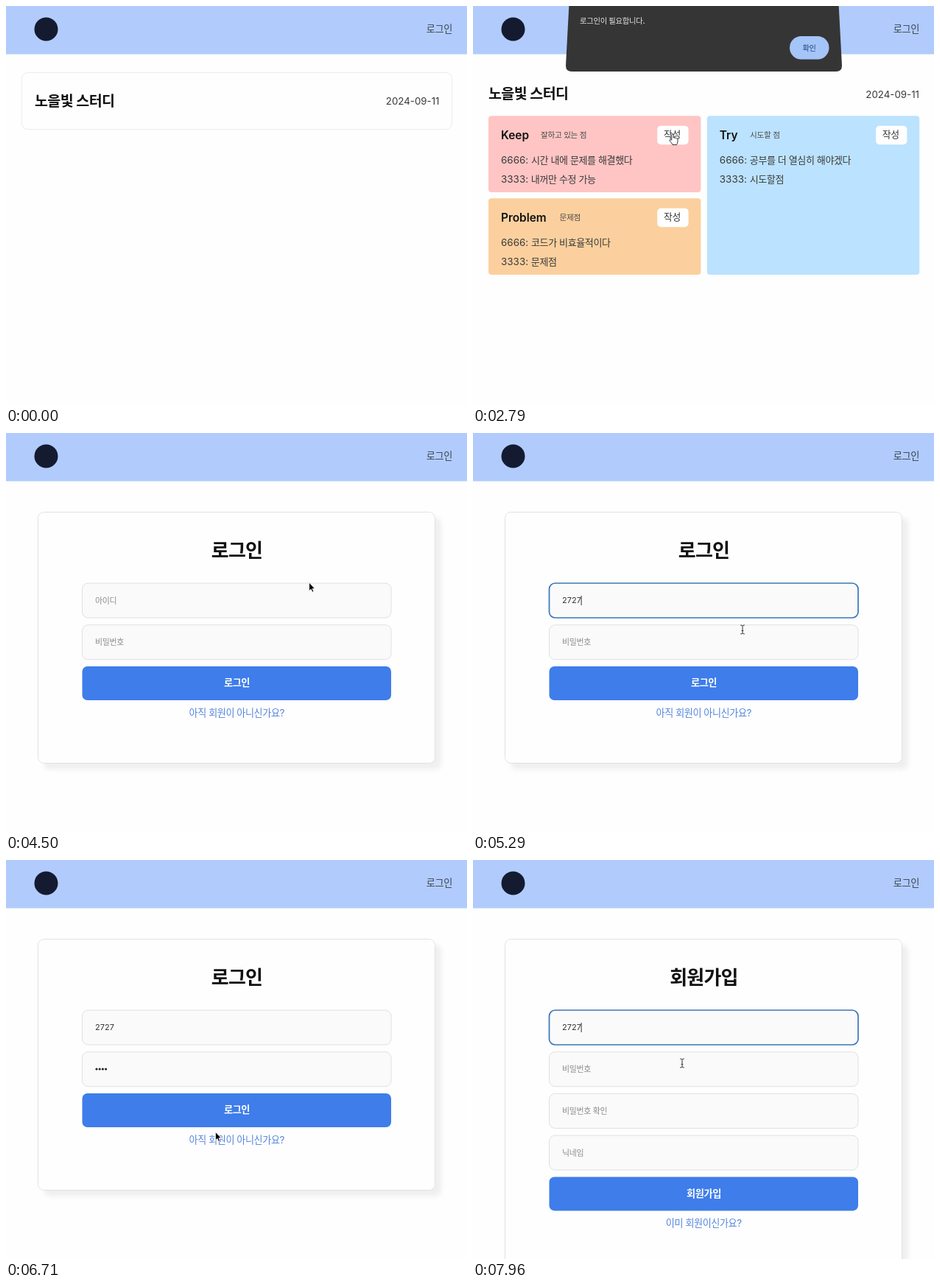
Write an HTML page that moves like this. It is 626 by 542 pixels and loops after 8 s.

```html
<!DOCTYPE html>
<html lang="ko">
<head>
<meta charset="utf-8">
<style>
  html, body { margin: 0; width: 100%; height: 100%; overflow: hidden; background: #fefefe; }
  svg { display: block; width: 626px; height: 542px; font-family: Inter, "Noto Sans CJK KR", "Noto Sans CJK", sans-serif; }
  .ko { font-size: .97em; letter-spacing: -.03em; }
  .card { fill: #fefefe; stroke: #e2e2e2; filter: drop-shadow(8px 8px 3px #0000000f); }
</style>
</head>
<body>
<svg id="stage" viewBox="0 0 626 542"></svg>
<script>
const LOOP = 8000;
const stage = document.getElementById('stage');
const clamp = v => Math.max(0, Math.min(1, v));
const ease = v => v * v * (3 - 2 * v);

// Hangul runs are set slightly tighter than Latin text.
const text = (x, y, size, str, fill = '#333', weight = 400, anchor = 'start') =>
  `<text x="${x}" y="${y}" font-size="${size}" fill="${fill}" font-weight="${weight}" text-anchor="${anchor}">` +
  str.replace(/[가-힣]+( [가-힣]+)*/g, '<tspan class="ko">$&</tspan>') + '</text>';
const rect = (x, y, w, h, r, fill, attrs = '') =>
  `<rect x="${x}" y="${y}" width="${w}" height="${h}" rx="${r}" fill="${fill}" ${attrs}/>`;

const header = () =>
  rect(0, 0, 626, 65.5, 0, '#b1ccfc') +
  '<circle cx="54.5" cy="31.5" r="16" fill="#141b30"/>' +
  text(606, 35.7, 13.6, '로그인', '#3a4355', 400, 'end');

const listPage = () =>
  rect(21.5, 90.5, 584, 77, 8, '#fefefe', 'stroke="#ebebeb"') +
  text(39, 135.5, 20.1, '노을빛 스터디', '#111', 600) +
  text(588.5, 134, 13.3, '2024-09-11', '#3a3a3a', 400, 'end');

function panel(x, y, h, fill, title, noteX, note, items) {
  return rect(x, y, 288.4, h, 4, fill) +
    text(x + 17, y + 31.2, 15.4, title, '#111', 600) +
    text(noteX, y + 29.2, 11, note, '#4a4a4a') +
    rect(x + 229.2, y + 13.4, 42.4, 25.5, 5, '#fefefe') +
    text(x + 249.4, y + 30, 13.2, '작성', '#333', 400, 'middle') +
    items.map((s, i) => text(x + 17, y + 64.9 + i * 25.6, 13.45, s, '#3a3a3a')).join('');
}

const boardPage = () =>
  text(21, 126.2, 20.1, '노을빛 스터디', '#111', 600) +
  text(606, 124.8, 13.3, '2024-09-11', '#3a3a3a', 400, 'end') +
  panel(21, 149.3, 103.7, '#fec5c4', 'Keep', 92, '잘하고 있는 점', ['6666: 시간 내에 문제를 해결했다', '3333: 내꺼만 수정 가능']) +
  panel(21, 261.3, 103.7, '#fbd09e', 'Problem', 117.5, '문제점', ['6666: 코드가 비효율적이다', '3333: 문제점']) +
  panel(317.8, 149.3, 215.7, '#bbe2fe', 'Try', 376, '시도할 점', ['6666: 공부를 더 열심히 해야겠다', '3333: 시도할점']);

function field(row, hint, { count = 0, focus = false, secret = false } = {}) {
  const y = 204 + row * 56.7;
  let value = text(121, y + 27.5, 11.3, hint, '#8c8c8c');
  if (count && secret) {
    value = '';
    for (let i = 0; i < count; i++) value += `<circle cx="${123 + i * 4.2}" cy="${y + 23.3}" r="1.6" fill="#222"/>`;
  } else if (count) {
    value = text(121, y + 27, 11, '2727'.slice(0, count), '#333');
  }
  const caretX = 121 + count * (secret ? 4.3 : 6.4);
  return rect(103.5, y, 419.5, 47, 8, '#fafafa', focus ? 'stroke="#3b75bb" stroke-width="1.7"' : 'stroke="#e0e0e0"') +
    value + (focus ? rect(caretX, y + 17, 1, 13, 0, '#333') : '');
}

function form(height, title, fields, link) {
  const y = 204 + fields.length * 56.7;
  return `<rect class="card" x="43.5" y="107.5" width="539" height="${height}" rx="8"/>` +
    text(313.5, 168.5, 26.8, title, '#111', 600, 'middle') + fields.join('') +
    rect(103.5, y - .4, 419.5, 46, 7, '#3e7dea') +
    text(313.5, y + 27, 13.6, title, '#fff', 600, 'middle') +
    text(313.5, y + 67.5, 13.5, link, '#5585dc', 400, 'middle');
}

// Characters typed so far, one every `step` ms.
const typed = (t, start, step) => Math.max(0, Math.min(4, Math.floor((t - start) / step) + 1));

const loginPage = t => form(341, '로그인', [
  field(0, '아이디', { count: typed(t, 4850, 90), focus: t >= 4650 && t < 5330 }),
  field(1, '비밀번호', { count: typed(t, 5370, 65), focus: t >= 5330 && t < 5930, secret: true })
], '아직 회원이 아니신가요?');

const joinPage = t => form(454, '회원가입', [
  field(0, '아이디', { count: typed(t, 7640, 85), focus: t >= 7540 }),
  field(1, '비밀번호'), field(2, '비밀번호 확인'), field(3, '닉네임')
], '이미 회원이신가요?');

function alertSheet(t, open, close, message) {
  const p = Math.min(clamp((t - open) / 160), clamp((close + 160 - t) / 160));
  if (!p) return '';
  return `<g opacity="${p}" transform="translate(0 ${(p - .75) * 40})">` +
    '<path d="M133-60L126 71q0 8 8 8H493q8 0 8-8L494-60z" fill="#353535"/>' +
    text(145, 13.5, 10.7, message, '#e6e6e6', 500) +
    rect(430, 31, 53.5, 31.5, 15.7, '#a5c4f7') +
    text(456.5, 50.5, 10.5, '확인', '#1f4680', 500, 'middle') + '</g>';
}

const shapes = {
  arrow: '<path d="M0 0V11.6L2.6 9.2 4.3 13.2 6.3 12.3 4.6 8.5H8z" fill="#000" stroke="#fff" stroke-width=".9"/>',
  hand: '<path d="M-1.2 8V1a1.2 1.2 0 0 1 2.4 0V5q1.2-.8 2.1.3 1.3-.6 2 .5 1.5-.3 1.7 1.2V10q0 2-1.5 4.5H0Q-1 12-3.8 9.3q-.6-1.9 1.2-1.5z" fill="#fff" stroke="#222" stroke-width=".9"/>',
  beam: '<path d="M-2.8-6Q0-6 0-4.6 0-6 2.8-6M0-4.6V4.6M-2.8 6Q0 6 0 4.6 0 6 2.8 6M-1.3 1.5H1.3" fill="none" stroke="#333"/>'
};

// time, x, y, shape from this time on
const path = [
  [1080, 310, 118, 'hand'], [1250, 268, 106, 'hand'], [1500, 268, 105, 'arrow'],
  [2290, 268, 105, 'arrow'], [2500, 271, 174, 'hand'], [3190, 271, 174, 'arrow'],
  [3520, 570, 40, 'hand'], [3630, 577, 32, 'hand'], [4290, 577, 32, 'arrow'],
  [4540, 400, 215, 'beam'], [4640, 380, 230, 'beam'], [4850, 380, 230, 'beam'],
  [5250, 366, 267, 'beam'], [5670, 366, 267, 'beam'], [5780, 353, 318, 'arrow'],
  [5900, 349, 326, 'arrow'], [6580, 349, 326, 'arrow'], [6760, 270, 379, 'hand'],
  [6920, 265, 381, 'beam'], [7170, 264, 383, 'beam'], [7330, 264, 383, 'beam'],
  [7520, 282, 234, 'beam'], [7640, 282, 234, 'beam'], [7860, 284, 276, 'beam']
];

function cursor(t) {
  const i = path.findLastIndex(k => k[0] <= t);
  if (i < 0) return '';
  const [t0, x0, y0, shape] = path[i];
  const [t1, x1, y1] = path[i + 1] || [LOOP, x0, y0];
  const p = ease(clamp((t - t0) / (t1 - t0)));
  return `<g transform="translate(${x0 + (x1 - x0) * p} ${y0 + (y1 - y0) * p})">${shapes[shape]}</g>`;
}

function scene(t) {
  const page = t < 1500 ? listPage : t < 3830 ? boardPage : t < 6920 ? loginPage : joinPage;
  return header() + page(t) +
    alertSheet(t, 2620, 3020, '로그인이 필요합니다.') +
    alertSheet(t, 5960, 6400, '존재하지 않는 사용자입니다.') +
    cursor(t);
}

let shown = '';
const start = performance.now();
function draw() {
  const next = scene((performance.now() - start) % LOOP);
  if (next !== shown) stage.innerHTML = shown = next;
  requestAnimationFrame(draw);
}
draw();
</script>
</body>
</html>
```
